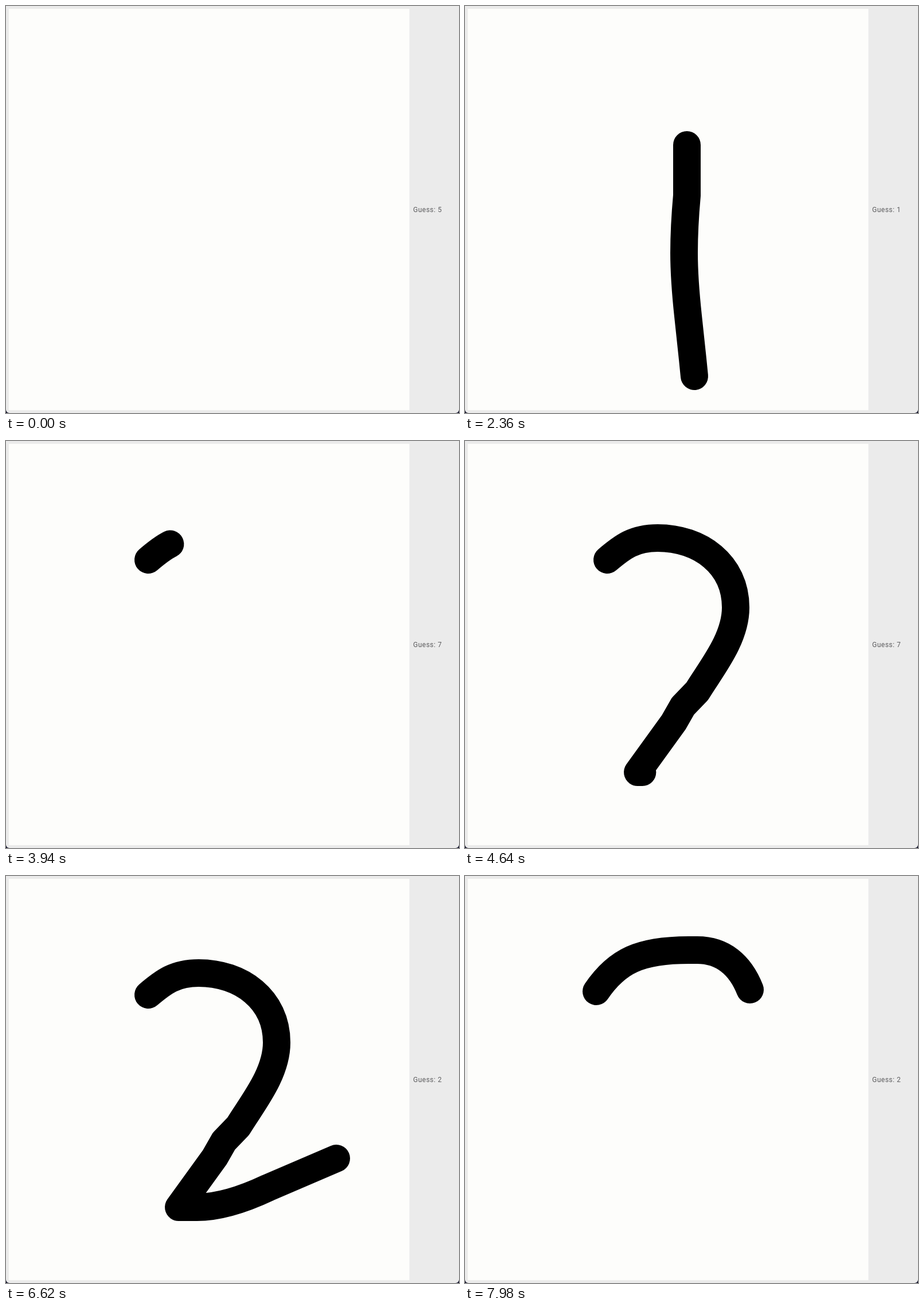
An HTML page with a canvas that plays this animation: 790 by 709 pixels, repeating every 8000 ms.

```html
<!DOCTYPE html>
<html lang="en">
<head>
<meta charset="utf-8">
<title>Digit guess</title>
<style>
  html, body { margin: 0; width: 100%; height: 100%; overflow: hidden; background: #12122a; }
  canvas { display: block; }
</style>
</head>
<body>
<canvas id="stage" width="790" height="709"></canvas>
<script>
const W = 790, H = 709, LOOP = 8000, BRUSH = 48;
const ctx = document.getElementById('stage').getContext('2d');

// A pen line drawn at constant speed from start to end, wiped at clear
function penStroke(start, end, clear, d) {
  const path = document.createElementNS('http://www.w3.org/2000/svg', 'path');
  path.setAttribute('d', d);
  return { start, end, clear, shape: new Path2D(d), length: path.getTotalLength() };
}

const strokes = [
  penStroke(345, 1140, 2960,
    'M387 242 V330 Q382 385 382 430 T389 540 T397 615 L400 645'),
  penStroke(3886, 4970, 6820,
    'M248 207 C275 184 295 169 336 169 C410 169 472 215 472 290 ' +
    'C472 345 430 395 405 436 L380 462 L364 490 L301 577 H333 Q385 577 457 543 L576 492'),
  penStroke(7580, 7980, LOOP,
    'M229 201 C265 148 305 129 390 129 H405 C450 129 480 155 497 198')
];

// [time, digit shown from then on]
const guesses = [[0, 5], [500, 1], [2960, 5], [3900, 7], [4850, 2], [6820, 5], [7700, 2]];

function drawBackground() {
  ctx.clearRect(0, 0, W, H);
  ctx.fillStyle = '#ebebeb';
  ctx.beginPath();
  ctx.roundRect(0, 0, W, H, [0, 0, 6, 6]);
  ctx.fill();
  ctx.fillStyle = '#fdfdfb';
  ctx.fillRect(5, 5, 698.5, 699);
}

function drawStroke({ start, end, clear, shape, length }, t) {
  if (t < start || t >= clear) return;
  const drawn = length * Math.min(1, (t - start) / (end - start));
  ctx.strokeStyle = '#000';
  ctx.lineWidth = BRUSH;
  ctx.lineCap = ctx.lineJoin = 'round';
  ctx.setLineDash([Math.max(drawn, 0.1), 2 * length]);
  ctx.stroke(shape);
}

function drawGuess(t) {
  const digit = guesses.filter(([from]) => from <= t).pop()[1];
  ctx.font = '12px Roboto, sans-serif';
  ctx.letterSpacing = '0.5px';
  ctx.fillStyle = '#5c5c5e';
  ctx.fillText(`Guess: ${digit}`, 710, 359);
}

function draw(t) {
  drawBackground();
  for (const s of strokes) drawStroke(s, t);
  drawGuess(t);
}

const begin = performance.now();
function tick() {
  draw((performance.now() - begin) % LOOP);
  requestAnimationFrame(tick);
}
tick();
</script>
</body>
</html>
```
